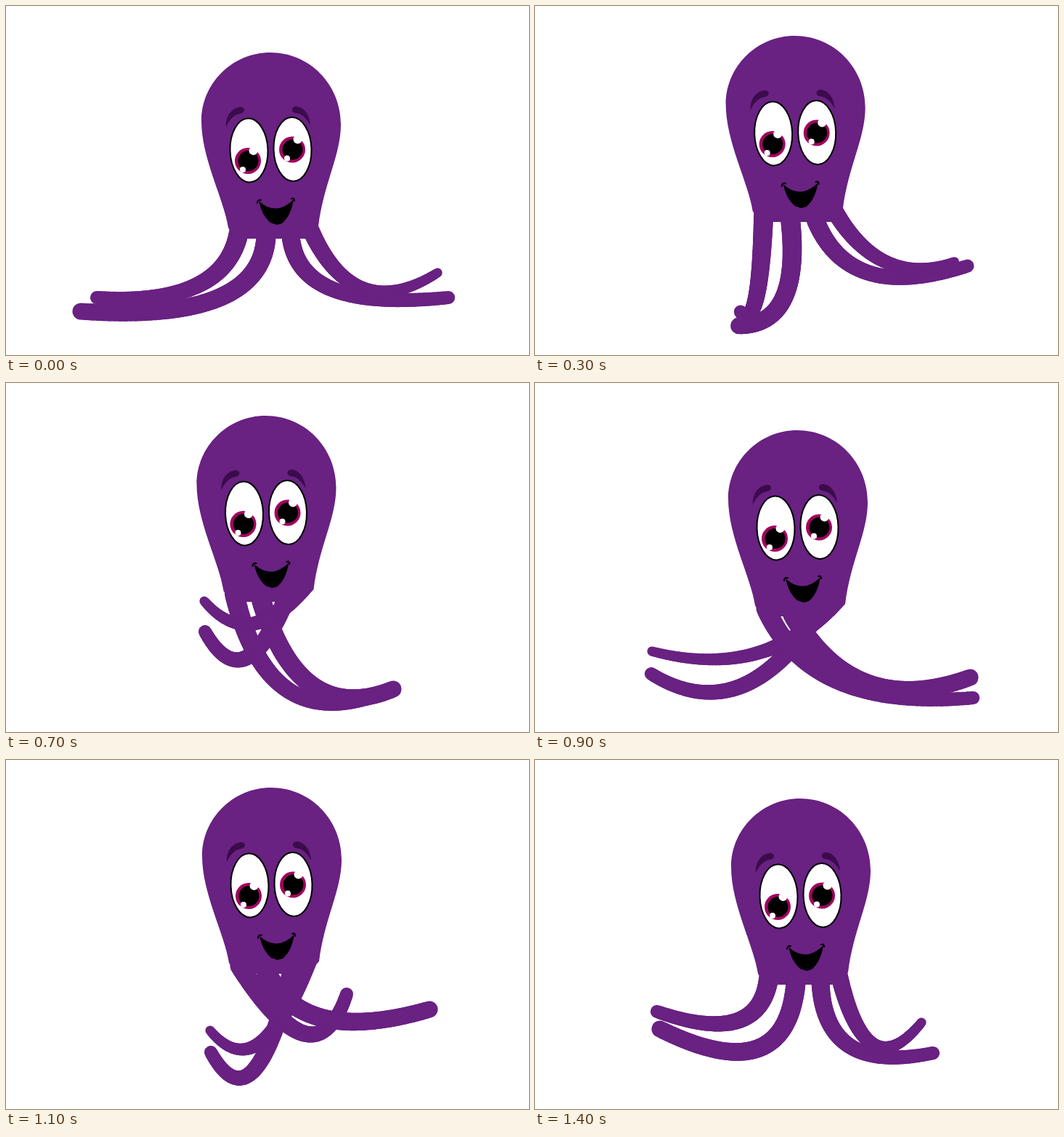
An HTML page with a canvas that plays this animation: 720 by 480 pixels, repeating every 1500 ms.

```html
<!DOCTYPE html>
<html>
<head>
<meta charset="utf-8">
<title>Swimming octopus</title>
<style>
html, body { margin: 0; overflow: hidden; background: #fff; }
canvas { display: block; }
</style>
</head>
<body>
<canvas id="stage" width="720" height="480"></canvas>
<script>
const ctx = document.getElementById('stage').getContext('2d');
const STEP = 100, STEPS = 15;
const SKIN = '#692182', BROW = '#3b0c4b', IRIS = '#a2045f';

// Key poses: step, then the head's offset from rest.
const headKeys = [
  [0, 0, 0], [2, -4, -14], [5, -9.5, -35], [7, -6.5, -19],
  [9, -3, 1], [11, 1, -26], [12, 1, -43], [14, 1, -11]
];

// An arm bends from its shoulder past a knee to its tip.
// Keys: step, knee x and y, tip x and y.
const arms = [
  { shoulder: [321, 309], thick: 27, thin: 18, keys: [
    [0, 302, 414, 125, 401], [2, 305, 440, 236, 409], [5, 327, 474, 382, 441],
    [7, 362, 495, 533, 421], [9, 380, 452, 603, 433], [11, 426, 450, 469, 322],
    [14, 310, 396, 168, 346]] },
  { shoulder: [358, 318], thick: 27, thin: 23, keys: [
    [0, 350, 436, 103, 420], [2, 367, 465, 211, 425], [5, 368, 381, 427, 464],
    [7, 404, 474, 533, 421], [9, 439, 464, 599, 405], [11, 408, 394, 583, 343],
    [14, 345, 456, 172, 370]] },
  { shoulder: [392, 316], thick: 25, thin: 18, keys: [
    [0, 402, 422, 609, 401], [2, 430, 418, 632, 374], [5, 404, 400, 453, 332],
    [7, 328, 438, 274, 342], [9, 286, 478, 160, 400], [11, 342, 510, 282, 402],
    [14, 398, 434, 548, 403]] },
  { shoulder: [416, 300], thick: 24, thin: 13, keys: [
    [0, 475, 442, 594, 367], [2, 488, 398, 612, 366], [5, 412, 386, 444, 314],
    [7, 335, 372, 273, 300], [9, 318, 410, 161, 369], [11, 350, 455, 281, 372],
    [14, 455, 456, 532, 361]] }
];

const body = new Path2D(`M306 305 C300 265 269 210 269 158 C269 107 311 64 364 64
  C418 64 461 108 461 163 C461 205 437 245 430 303 L414 320 H315 Z`);
const brows = new Path2D(`M303 166 C302 149 313 139 324 139 C330 140 329 147 323 148 C314 149 308 156 303 166 Z
  M419 164 C418 148 409 138 398 138 C392 140 393 146 398 147 C408 148 414 155 419 164 Z`);
const mouth = new Path2D(`M348 268 Q372 290 396 266 C393 283 388 292 380 299 L373 301 L364 298
  C356 291 351 282 348 268 Z`);
const dimples = new Path2D('M346 271 Q346 266 351 267 M393 265 Q397 263 397 268');

// Smooth looping curve through the keys; returns the values at step t.
function pose(keys, t) {
  const n = keys.length;
  const i = keys.findLastIndex(key => key[0] <= t);
  const near = [i - 1, i, i + 1, i + 2].map(k => {
    const [time, ...values] = keys[(k + n) % n];
    return { time: time + Math.floor(k / n) * STEPS, values };
  });
  const [a, h, b] = [0, 1, 2].map(k => near[k + 1].time - near[k].time);
  const u = (t - near[1].time) / h, v = 1 - u;
  return near[0].values.map((_, j) => {
    const [p0, p1, p2, p3] = near.map(key => key.values[j]);
    const slope = (p2 - p1) / h;
    const m1 = ((p1 - p0) / a * h + slope * a) / (a + h);
    const m2 = ((p3 - p2) / b * h + slope * b) / (b + h);
    return v * v * (1 + 2 * u) * p1 + u * u * (3 - 2 * u) * p2 + u * v * h * (v * m1 - u * m2);
  });
}

function drawArm({ shoulder, thick, thin, keys }, [dx, dy], t) {
  const [kneeX, kneeY, tipX, tipY] = pose(keys, t);
  const bend = (from, knee, tip, s) =>
    (1 - s) ** 2 * from + 2 * s * (1 - s) * knee + s * s * tip;
  const point = s => [
    bend(shoulder[0] + dx, kneeX, tipX, s),
    bend(shoulder[1] + dy, kneeY, tipY, s)
  ];
  const pieces = 60;
  for (let k = 0; k < pieces; k++) {
    ctx.lineWidth = thick + (thin - thick) * k / pieces;
    ctx.beginPath();
    ctx.moveTo(...point(k / pieces));
    ctx.lineTo(...point((k + 1) / pieces));
    ctx.stroke();
  }
}

function oval(x, y, rx, ry, fill) {
  ctx.beginPath();
  ctx.ellipse(x, y, rx, ry, -.03, 0, 2 * Math.PI);
  ctx.fillStyle = fill;
  ctx.fill();
}

function drawEye(x, y, irisX, irisY) {
  oval(x, y, 26, 44, '#fff');
  ctx.lineWidth = 2;
  ctx.stroke();
  oval(irisX, irisY, 18, 18, IRIS);
  oval(irisX + .5, irisY, 14, 14, '#000');
  oval(irisX + 7.5, irisY - 14, 6, 6, '#fff');
  oval(irisX - 7, irisY + 12, 4, 4, '#fff');
}

function draw(t) {
  const head = pose(headKeys, t);
  ctx.fillStyle = '#fff';
  ctx.fillRect(0, 0, 720, 480);
  ctx.lineCap = 'round';
  ctx.strokeStyle = SKIN;
  arms.forEach(arm => drawArm(arm, head, t));

  ctx.save();
  ctx.translate(...head);
  ctx.fillStyle = SKIN;
  ctx.fill(body);
  ctx.fillStyle = BROW;
  ctx.fill(brows);
  ctx.strokeStyle = '#000';
  drawEye(334.5, 198.5, 333, 213);
  drawEye(394.5, 197, 394, 197.5);
  ctx.fillStyle = '#000';
  ctx.fill(mouth);
  ctx.stroke(dimples);
  ctx.restore();
}

function tick() {
  draw(Math.floor(performance.now() / STEP) % STEPS);
  requestAnimationFrame(tick);
}
tick();
</script>
</body>
</html>
```
